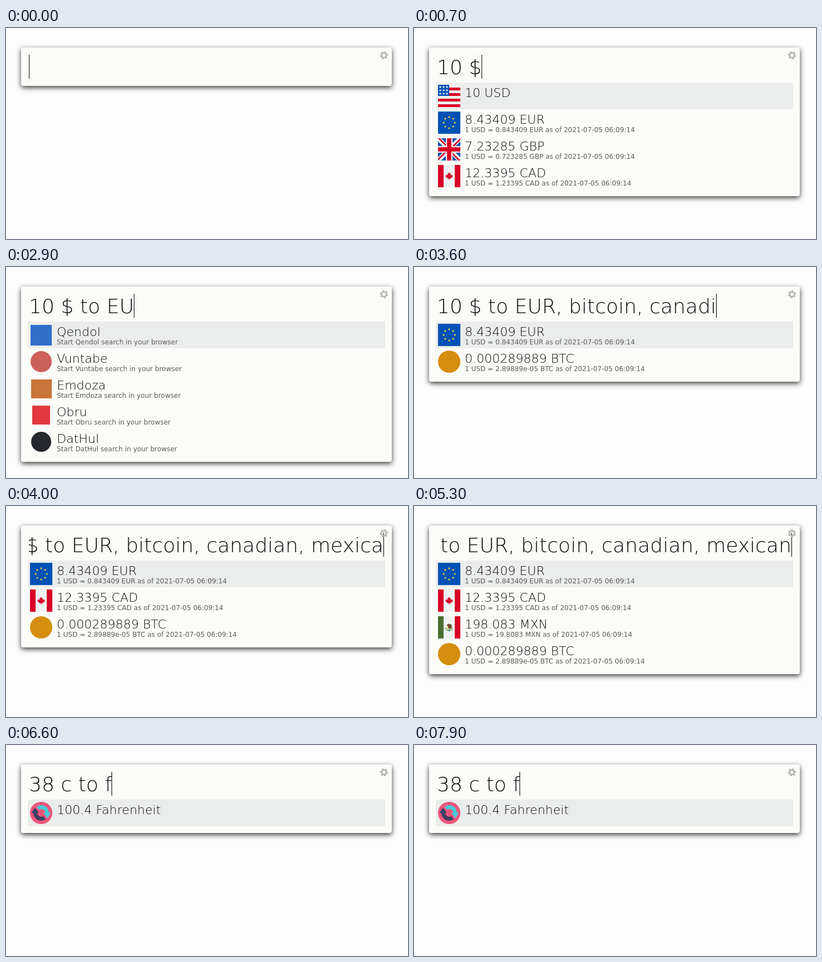
Recreate the animation shown at these times as an HTML page with a canvas. Size 720x379 px, loop 8 s.

```html
<!DOCTYPE html>
<html lang="en">
<head>
<meta charset="utf-8">
<title>Launcher conversions</title>
<style>
html, body { margin: 0; width: 100%; height: 100%; overflow: hidden; background: #fefdfe; }
canvas { display: block; }
</style>
</head>
<body>
<canvas id="stage" width="720" height="379"></canvas>
<script>
const ctx = document.getElementById('stage').getContext('2d');
const LOOP = 8000, STEP = 100;
const RATE = 18 / 700; // typed characters per ms
const PAPER = '#fbfcf8', PICKED = '#ebedec';
const RED = '#d80027', BLUE = '#0052b4', WHITE = '#f0f0f0', GOLD = '#ffda44';
const FAMILY = '"DejaVu Sans Light", "DejaVu Sans", sans-serif';
const BOOK = '"DejaVu Sans", sans-serif';

// ---- text ----

// Total ink of a sample letter, used to see whether a light face exists
function ink(font) {
  const c = document.createElement('canvas');
  c.width = c.height = 100;
  const g = c.getContext('2d', { willReadFrequently: true });
  g.font = font;
  g.fillText('H', 10, 90);
  let sum = 0;
  g.getImageData(0, 0, 100, 100).data.forEach(v => sum += v);
  return sum;
}
const hasLight = ink('200 90px ' + FAMILY) < 0.8 * ink('400 90px ' + BOOK);

function lightText(str, x, y, size, back) {
  ctx.font = `200 ${size}px ${FAMILY}`;
  ctx.fillStyle = '#0c0c0c';
  ctx.fillText(str, x, y);
  if (!hasLight) {
    ctx.strokeStyle = back;
    ctx.lineWidth = size * 0.042;
    ctx.lineJoin = 'round';
    ctx.strokeText(str, x, y);
  }
}

// ---- shapes ----

function rect(color, x, y, w, h) {
  ctx.fillStyle = color;
  ctx.fillRect(x, y, w, h);
}

function disc(color, x, y, r) {
  ctx.fillStyle = color;
  ctx.beginPath();
  ctx.arc(x, y, r, 0, 2 * Math.PI);
  ctx.fill();
}

function line(color, width, x1, y1, x2, y2) {
  ctx.strokeStyle = color;
  ctx.lineWidth = width;
  ctx.beginPath();
  ctx.moveTo(x1, y1);
  ctx.lineTo(x2, y2);
  ctx.stroke();
}

function arc(color, width, x, y, r, from, to) {
  ctx.strokeStyle = color;
  ctx.lineWidth = width;
  ctx.beginPath();
  ctx.arc(x, y, r, from, to);
  ctx.stroke();
}

function polygon(color, points) {
  ctx.fillStyle = color;
  ctx.beginPath();
  points.forEach(([x, y]) => ctx.lineTo(x, y));
  ctx.closePath();
  ctx.fill();
}

function star(color, x, y, r) {
  polygon(color, Array.from({ length: 10 }, (_, i) => {
    const a = i * Math.PI / 5 - Math.PI / 2, d = i % 2 ? r * 0.42 : r;
    return [x + d * Math.cos(a), y + d * Math.sin(a)];
  }));
}

// ---- icons, each on a 40 by 40 tile ----

function sideBands(left, right) {
  rect(WHITE, 0, 0, 40, 40);
  rect(left, 0, 0, 10, 40);
  rect(right, 30, 0, 10, 40);
}

const LEAF = [[0, -7], [1.7, -4], [3.2, -4.8], [2.5, -0.8], [4.4, -2.6], [4.9, -1.4],
  [6.8, -1.6], [5.9, 0.4], [6.6, 1.2], [2.8, 3.7], [3.2, 4.8], [0.5, 4.4], [0.5, 7]];

const icons = {
  usa() {
    rect(WHITE, 0, 0, 40, 40);
    for (let y = 5; y < 40; y += 10) rect(RED, 0, y, 40, 5);
    rect(BLUE, 0, 0, 20, 20);
    for (let i = 0; i < 9; i++) star(WHITE, 4 + i % 3 * 6, 4 + Math.floor(i / 3) * 6, 2.6);
  },
  euro() {
    rect(BLUE, 0, 0, 40, 40);
    for (let i = 0; i < 8; i++) {
      const a = i * Math.PI / 4;
      star(GOLD, 20 + 10 * Math.cos(a), 20 + 10 * Math.sin(a), 2.4);
    }
  },
  britain() {
    rect(BLUE, 0, 0, 40, 40);
    line(WHITE, 8, 0, 0, 40, 40);
    line(WHITE, 8, 40, 0, 0, 40);
    for (let i = 0; i < 4; i++) {
      ctx.save();
      ctx.translate(20, 20);
      ctx.rotate(i * Math.PI / 2);
      line(RED, 2.6, 0, 1.6, 20, 21.6);
      ctx.restore();
    }
    rect(WHITE, 14, 0, 12, 40);
    rect(WHITE, 0, 14, 40, 12);
    rect(RED, 16.2, 0, 7.6, 40);
    rect(RED, 0, 16.2, 40, 7.6);
  },
  canada() {
    sideBands(RED, RED);
    const right = LEAF.map(([x, y]) => [20 + x, 20 + y]);
    const left = LEAF.map(([x, y]) => [20 - x, 20 + y]).reverse();
    polygon(RED, right.concat(left));
  },
  mexico() {
    sideBands('#4a7030', RED);
    arc('#6da544', 1.8, 20, 20, 6, 0.1, Math.PI - 0.1);
    polygon('#6b5230', [[15, 16], [19, 13.5], [24, 15], [25, 20], [22, 23], [17, 22], [18, 18]]);
    disc('#d9a63a', 18, 21, 1.4);
    disc('#3b8fae', 20, 25, 1.4);
  },
  coin() { disc('#d58e0e', 20, 20, 20); },
  convert() {
    disc('#f0557c', 20, 20, 20);
    ['#3c4161', '#46cbd8'].forEach((color, i) => {
      ctx.save();
      ctx.translate(20, 20);
      ctx.rotate(i ? 0 : Math.PI);
      arc(color, 7, 0, 0, 10.5, -2.2, 0.05);
      polygon(color, [[4, 0], [17.5, 0], [11, 9.5]]);
      ctx.restore();
    });
  },
  blueTile() { rect('#2f6fc9', 1, 2, 38, 37); },
  redDot() { disc('#cd6059', 20, 20, 19); },
  orangeTile() { rect('#c97439', 2, 4, 37, 34); },
  scarletTile() { rect('#e23a3f', 4, 3, 32, 34); },
  darkDot() { disc('#25282c', 20, 20, 18); }
};

// ---- results ----

function money(icon, code, amount, rate) {
  return { icon, title: `${amount} ${code}`, note: `1 USD = ${rate} ${code} as of 2021-07-05 06:09:14` };
}

function search(icon, name) {
  return { icon, title: name, note: `Start ${name} search in your browser` };
}

const EUR = money('euro', 'EUR', '8.43409', '0.843409');
const GBP = money('britain', 'GBP', '7.23285', '0.723285');
const CAD = money('canada', 'CAD', '12.3395', '1.23395');
const MXN = money('mexico', 'MXN', '198.083', '19.8083');
const BTC = money('coin', 'BTC', '0.000289889', '2.89889e-05');
const USD = { icon: 'usa', title: '10 USD' };
const WEB = [
  search('blueTile', 'Qendol'),
  search('redDot', 'Vuntabe'),
  search('orangeTile', 'Emdoza'),
  search('scarletTile', 'Obru'),
  search('darkDot', 'DatHul')
];
const TARGETS = [['EUR', EUR], ['canadian', CAD], ['mexican', MXN], ['bitcoin', BTC]];

function resultsFor(query) {
  const q = query.trim();
  if (q === '10 $') return [USD, EUR, GBP, CAD];
  if (q === '38 c') return [{ icon: 'convert', title: '38 Celsius' }];
  if (q === '38 c to f') return [{ icon: 'convert', title: '100.4 Fahrenheit' }];
  if (!q.includes(' t')) return [];
  const found = TARGETS.filter(([word]) => q.includes(word)).map(pair => pair[1]);
  return found.length ? found : WEB;
}

// ---- timeline: shown from, typing starts, last key, text ----

const PHASES = [
  { from: 0, start: 144, done: 300, text: '10 $' },
  { from: 2700, start: 2511, done: 4100, text: '10 $ to EUR, bitcoin, canadian, mexican' },
  { from: 6100, start: 6144, done: 6500, text: '38 c to f' }
];

function stateAt(t) {
  const p = PHASES.filter(phase => t >= phase.from).pop();
  const count = Math.max(0, Math.round((t - p.start) * RATE));
  const idle = t - p.done;
  return { query: p.text.slice(0, count), cursor: idle < 0 || idle % 1000 < 500 };
}

// ---- drawing ----

function drawPanel(rows) {
  ctx.save();
  ctx.shadowColor = 'rgba(0, 0, 0, 0.78)';
  ctx.shadowBlur = 10;
  ctx.shadowOffsetY = 3;
  ctx.fillStyle = PAPER;
  ctx.beginPath();
  ctx.roundRect(27, 35, 664, rows ? 75 + 48 * rows : 69, 4);
  ctx.fill();
  ctx.restore();
}

function drawQuery(query, cursor) {
  ctx.save();
  ctx.beginPath();
  ctx.rect(41, 44, 637, 50);
  ctx.clip();
  ctx.font = `200 36px ${FAMILY}`;
  const width = ctx.measureText(query).width;
  const x = 41 - Math.max(0, width - 635);
  lightText(query, x, 83, 36, PAPER);
  if (cursor) rect('#000', Math.floor(x + width + 0.01), 48, 1, 43);
  ctx.restore();
}

function drawRow(row, i) {
  const y = 98 + 48 * i;
  if (i === 0) rect(PICKED, 39, y, 640, 48);
  ctx.save();
  ctx.translate(43, y + 4);
  ctx.beginPath();
  ctx.rect(0, 0, 40, 40);
  ctx.clip();
  icons[row.icon]();
  ctx.restore();
  lightText(row.title, 91, y + 26, 22, i ? PAPER : PICKED);
  if (row.note) {
    ctx.font = '12px ' + BOOK;
    ctx.fillStyle = '#5c5d5c';
    ctx.fillText(row.note, 91, y + 41);
  }
}

function drawGear(t) {
  ctx.save();
  ctx.translate(677, 49);
  ctx.rotate((51 + t * 0.03) * Math.PI / 180);
  arc('#b5b6b4', 2.6, 0, 0, 4.3, 0, 2 * Math.PI);
  for (let i = 0; i < 6; i++) {
    rect('#b5b6b4', 4.6, -1.7, 2.6, 3.4);
    ctx.rotate(Math.PI / 3);
  }
  ctx.restore();
}

function draw(now) {
  const t = Math.floor(now % LOOP / STEP) * STEP;
  const { query, cursor } = stateAt(t);
  const rows = resultsFor(query);
  rect('#fefdfe', 0, 0, 720, 379);
  drawPanel(rows.length);
  drawQuery(query, cursor);
  rows.forEach(drawRow);
  drawGear(t);
}

const begun = performance.now();
function tick() {
  draw(performance.now() - begun);
  requestAnimationFrame(tick);
}
tick();
</script>
</body>
</html>
```
